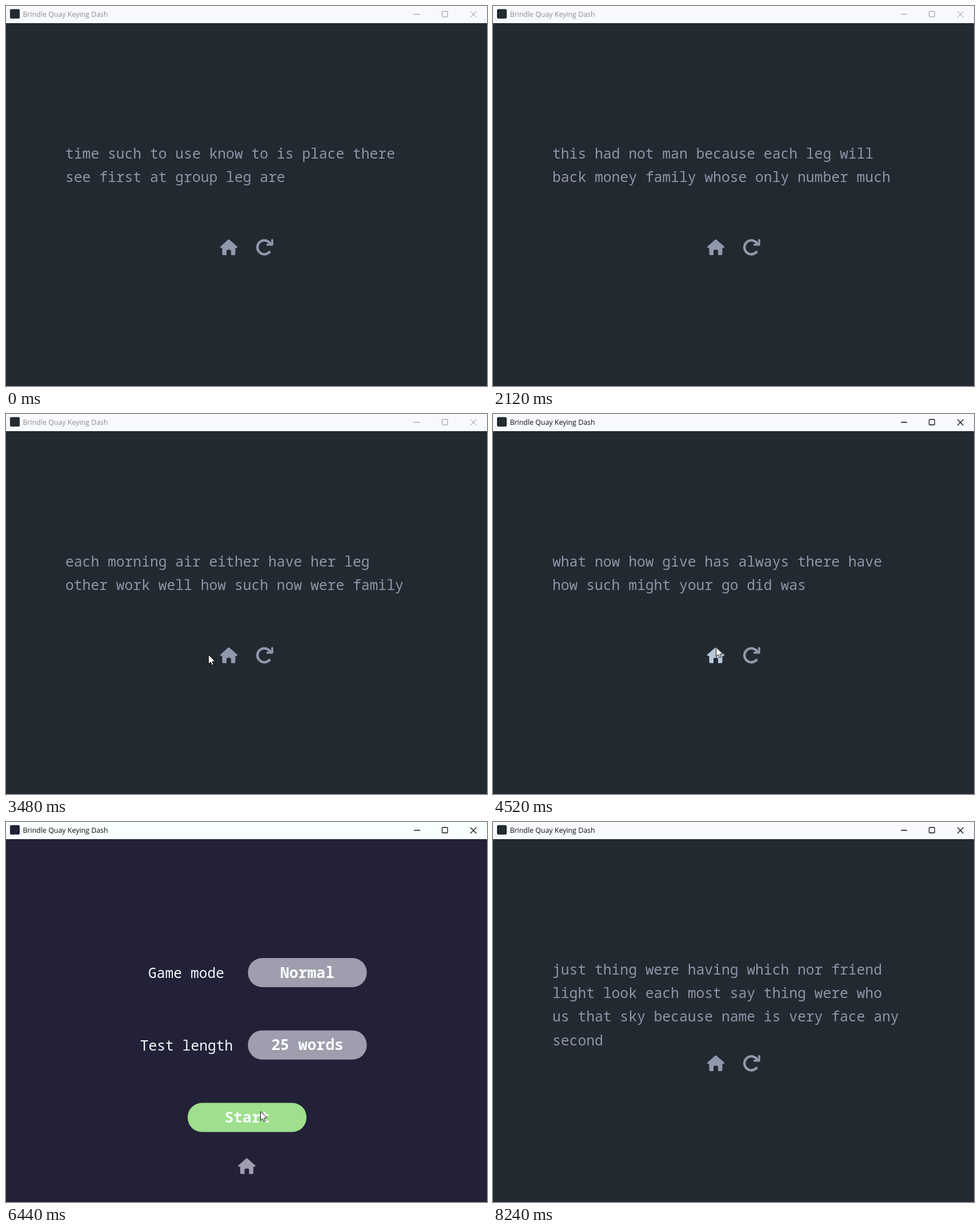
Recreate the animation shown at these times as an HTML page with a canvas. Size 842x665 px, loop 8280 ms.

```html
<!DOCTYPE html>
<html lang="en">
<head>
<meta charset="utf-8">
<title>Brindle Quay Keying Dash</title>
<style>
html, body { margin: 0; width: 100%; height: 100%; overflow: hidden; background: #222930; }
canvas { display: block; }
</style>
</head>
<body>
<canvas id="stage" width="842" height="665"></canvas>
<script>
const ctx = document.getElementById('stage').getContext('2d');
const LOOP = 8280;
const MONO = '"Roboto Mono", "Noto Sans Mono", "Liberation Mono", monospace';
const SANS = '"Open Sans", "Noto Sans", sans-serif';
const LINE_CHARS = 41;
const GREY = '#9098ac', HOVER = '#b8c8d8';

// When each screen of words begins.
const rounds = [
  [0, 'time such to use know to is place there see first at group leg are'],
  [440, 'one that question number day what up case their every year up get did week'],
  [1480, 'this had not man because each leg will back money family whose only number much'],
  [2800, 'each morning air either have her leg other work well how such now were family'],
  [4000, 'what now how give has always there have how such might your go did was'],
  [6640, 'just thing were having which nor friend light look each most say thing were who ' +
         'us that sky because name is very face any second']
];
const FOCUS = 4000, MENU_IN = 4760, MENU_OUT = 6640;

// Pointer stops: time, x, y
const stops = [
  [2900, 318, 668], [3440, 354, 421], [3640, 354, 421], [4000, 390, 408],
  [5000, 390, 408], [6240, 445, 506], [6800, 445, 506], [7300, 452, 420],
  [7640, 452, 420], [8080, 846, 300]
];

function wrap(words) {
  const lines = [];
  let line = '';
  for (const word of words.split(' ')) {
    const next = line ? line + ' ' + word : word;
    if (next.length > LINE_CHARS) {
      lines.push(line);
      line = word;
    } else line = next;
  }
  return lines.concat(line);
}
const pages = rounds.map(([start, words]) => ({ start, lines: wrap(words) }));

function pointerAt(t) {
  if (t < stops[0][0] || t >= stops[stops.length - 1][0]) return null;
  const i = stops.findIndex(s => s[0] > t);
  const [t0, x0, y0] = stops[i - 1], [t1, x1, y1] = stops[i];
  const u = (t - t0) / (t1 - t0), e = u * u * (3 - 2 * u);
  return { x: x0 + (x1 - x0) * e, y: y0 + (y1 - y0) * e };
}

function label(text, x, y, font, color, align = 'left') {
  ctx.font = font;
  ctx.fillStyle = color;
  ctx.textAlign = align;
  ctx.fillText(text, x, y);
}

function box(x, y, w, h, r, color) {
  ctx.fillStyle = color;
  ctx.beginPath();
  ctx.roundRect(x, y, w, h, r);
  ctx.fill();
}

function titleBar(active, menu) {
  ctx.fillStyle = menu ? '#f8ffff' : '#f8f9ff';
  ctx.fillRect(0, 0, 842, 30);
  box(7, 5.5, 17, 16.5, 2, menu ? '#222137' : '#222930');
  label('Brindle Quay Keying Dash', 29.5, 18.5, '12.4px ' + SANS, active ? '#101010' : '#8c8c8e');
  ctx.strokeStyle = active ? '#111' : '#8f8d86';
  ctx.lineWidth = active ? 1.3 : 1;
  ctx.lineCap = 'butt';
  ctx.beginPath();
  ctx.moveTo(714, 14.5);
  ctx.lineTo(725, 14.5);
  ctx.roundRect(763.5, 9.5, 9.5, 9.5, 1);
  ctx.moveTo(813, 9.5);
  ctx.lineTo(823.5, 20);
  ctx.moveTo(823.5, 9.5);
  ctx.lineTo(813, 20);
  ctx.stroke();
}

function home(cx, top, color) {
  ctx.save();
  ctx.translate(cx, top);
  ctx.fillStyle = ctx.strokeStyle = color;
  ctx.lineWidth = 3;
  ctx.lineJoin = 'round';
  ctx.beginPath();
  ctx.moveTo(0, 2);
  ctx.lineTo(13.6, 13.8);
  ctx.lineTo(-13.6, 13.8);
  ctx.closePath();
  ctx.fill();
  ctx.stroke();
  // walls with an arched doorway
  ctx.beginPath();
  ctx.moveTo(-11.5, 13);
  ctx.lineTo(11.5, 13);
  ctx.lineTo(11.5, 26);
  ctx.quadraticCurveTo(11.5, 28, 9.5, 28);
  ctx.lineTo(4, 28);
  ctx.lineTo(4, 21);
  ctx.quadraticCurveTo(4, 18.5, 1.5, 18.5);
  ctx.lineTo(-1.5, 18.5);
  ctx.quadraticCurveTo(-4, 18.5, -4, 21);
  ctx.lineTo(-4, 28);
  ctx.lineTo(-9.5, 28);
  ctx.quadraticCurveTo(-11.5, 28, -11.5, 26);
  ctx.closePath();
  ctx.fill();
  ctx.restore();
}

function restart(color) {
  ctx.strokeStyle = color;
  ctx.lineWidth = 4.4;
  ctx.lineCap = 'round';
  ctx.lineJoin = 'round';
  ctx.beginPath();
  ctx.arc(452.3, 422.3, 12.2, 0.75, -0.6);
  ctx.stroke();
  ctx.lineWidth = 3.6;
  ctx.beginPath();
  ctx.moveTo(466, 409.5);
  ctx.lineTo(466, 417.8);
  ctx.lineTo(457.5, 417.8);
  ctx.stroke();
}

function near(p, x, y) {
  return p && Math.abs(p.x - x) <= 15 && Math.abs(p.y - y) <= 15;
}

function drawGame(t, p) {
  const page = pages.filter(g => g.start <= t).pop();
  page.lines.forEach((line, i) =>
    label(line, 104, 266.7 + i * 41.3, '24.66px ' + MONO, '#8e95aa'));
  home(390, 408, near(p, 390, 422) ? HOVER : GREY);
  restart(near(p, 452, 422) ? HOVER : GREY);
}

function pill(text, x, y, color) {
  box(x, y, 208, 51, 25, color);
  label(text, x + 104, y + 34.5, '600 26.4px ' + MONO, '#f8ffff', 'center');
}

function drawMenu() {
  const font = '24.66px ' + MONO;
  label('Game mode', 315.5, 272.7, font, '#f4fafa', 'center');
  label('Test length', 316, 399.5, font, '#f4fafa', 'center');
  pill('Normal', 423.5, 238, '#9f9dae');
  pill('25 words', 423.5, 364.7, '#9f9dae');
  pill('Start', 318, 491.5, '#9fdf8d');
  home(421.5, 588, '#9f9dae');
}

function drawPointer({ x, y }) {
  const shape = [[0, 0], [0, 16], [3.7, 12.6], [6.2, 18], [8.7, 17], [6.3, 11.6], [11.3, 11.4]];
  ctx.beginPath();
  shape.forEach(([dx, dy]) => ctx.lineTo(x + dx + 0.5, y + dy + 0.5));
  ctx.closePath();
  ctx.fillStyle = '#fff';
  ctx.strokeStyle = '#111';
  ctx.lineWidth = 1;
  ctx.lineJoin = 'miter';
  ctx.fill();
  ctx.stroke();
}

function draw(t) {
  const menu = t >= MENU_IN && t < MENU_OUT;
  const p = pointerAt(t);
  ctx.fillStyle = menu ? '#222137' : '#222930';
  ctx.fillRect(0, 0, 842, 665);
  titleBar(t >= FOCUS, menu);
  if (menu) drawMenu();
  else drawGame(t, p);
  if (p) drawPointer(p);
}

const began = performance.now();
function tick() {
  const t = (performance.now() - began) % LOOP;
  draw(Math.floor(t / 40) * 40);
  requestAnimationFrame(tick);
}
tick();
</script>
</body>
</html>
```
